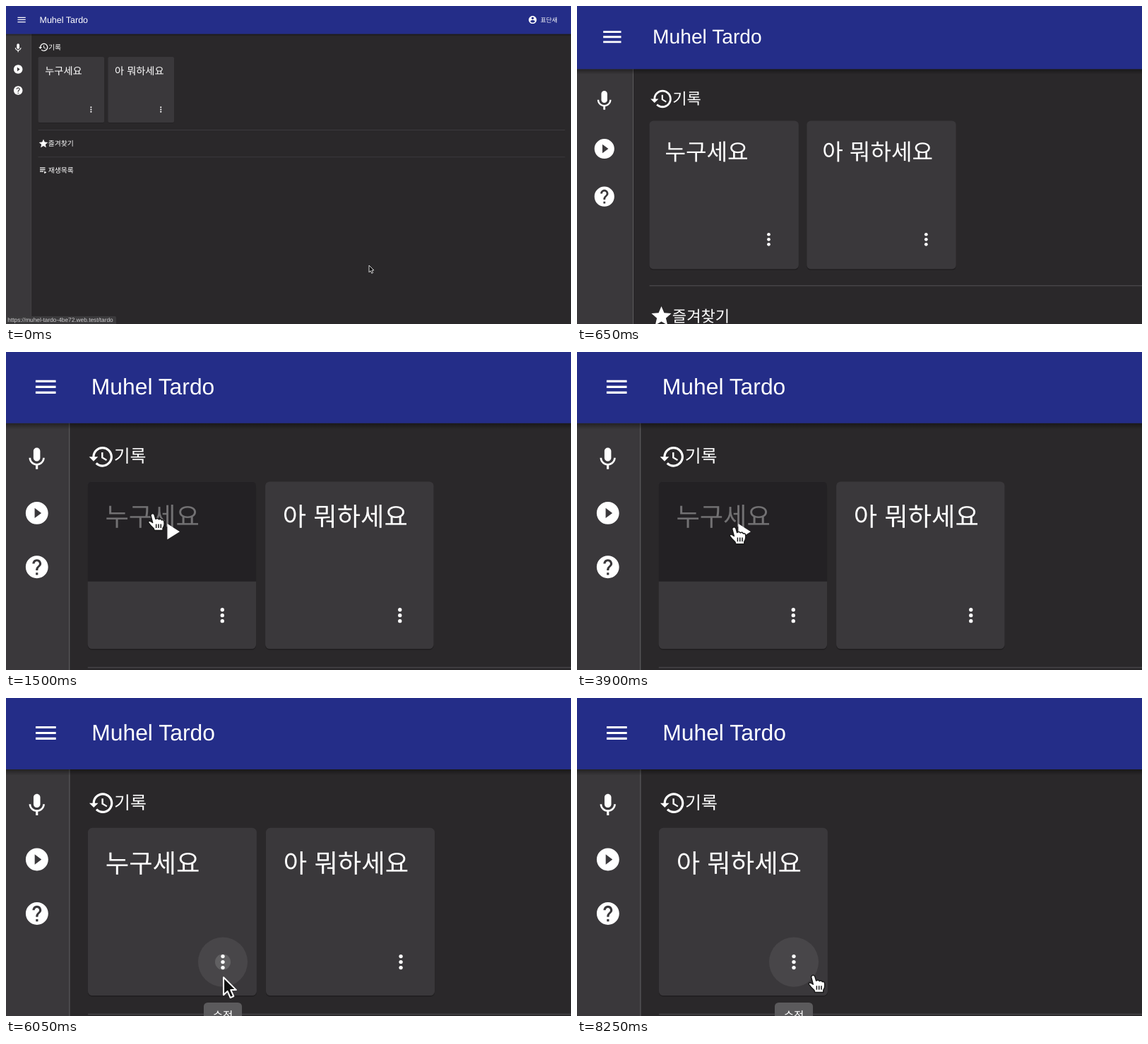
An HTML page that plays this animation: 800 px wide and 450 px high, repeating every 8300 ms.

```html
<!DOCTYPE html>
<html lang="ko">
<head>
<meta charset="utf-8">
<style>
html, body { margin: 0; width: 100%; height: 100%; overflow: hidden; background: #2a282a; }
svg { display: block; width: 800px; height: 450px; }
text { fill: #fff; font-family: "Noto Sans CJK KR", "Noto Sans CJK", sans-serif; text-rendering: geometricPrecision; }
.latin { font-family: "Liberation Sans", Arial, sans-serif; }
.icon { fill: #fff; }
</style>
</head>
<body>
<svg viewBox="0 0 800 450">
  <defs>
    <linearGradient id="shade" x2="0" y2="1">
      <stop stop-color="#000" stop-opacity=".4"/>
      <stop offset="1" stop-color="#000" stop-opacity="0"/>
    </linearGradient>
  </defs>
  <g id="page">
    <rect width="800" height="450" fill="#2a282a"/>
    <rect y="39" width="35" height="411" fill="#3a383b"/>
    <rect x="35" y="39" width=".5" height="411" fill="#5b595c"/>
    <rect y="39.6" width="800" height="3.4" fill="url(#shade)"/>
    <rect width="800" height="39.6" fill="#242d88"/>
    <text class="latin" x="47.5" y="23.6" font-size="12.5">Muhel Tardo</text>
    <text x="756.7" y="22.8" font-size="8.75">표단새</text>
    <path d="M45.5 175.5H791.5M45.5 213.7H791.5" stroke="#464447" stroke-width=".65"/>
    <text x="60" y="61.5" font-size="9.8">기록</text>
    <text x="59.8" y="198.2" font-size="9.8">즐겨찾기</text>
    <text x="59.8" y="236.2" font-size="9.8">재생목록</text>
    <g id="icons"></g>
    <g id="cards"></g>
    <g id="tip">
      <rect x="109.8" y="169" width="21.2" height="13.8" rx="2.2" fill="#5b5a5c"/>
      <text x="114.8" y="178.3" font-size="6.1">수정</text>
    </g>
    <g id="menu">
      <rect x="106.4" y="133.8" width="62.6" height="32" rx="2.5" fill="#000" opacity=".25"/>
      <rect x="106.7" y="133" width="62" height="32" rx="2.5" fill="#424043"/>
      <text x="116.7" y="152.8" font-size="10">삭제하기</text>
    </g>
    <g id="status">
      <path d="M0 439H154Q156 439 156 441V450H0Z" fill="#3b3a3c"/>
      <text class="latin" x="2.3" y="447.2" font-size="8.3" style="fill:#d0cfd1">https://muhel-tardo-4be72.web.test/tardo</text>
    </g>
    <g id="cursor">
      <path id="arrow" d="M0 0V9.8L2.2 7.7 3.8 11.3 5.6 10.5 4 7H7Z" fill="#111" stroke="#fff" stroke-width=".8" stroke-linejoin="round"/>
      <g id="hand" stroke="#1a1a1a" stroke-width=".6" stroke-linejoin="round">
        <path d="M-1.2 1Q-.2-.6.9.8L1.6 3.2Q2.7 2.4 3.4 3.4 4.5 2.7 5 3.8 6.1 3.4 6.3 4.6 6.7 6.8 5.6 8.3V9.6H.9L.5 8.5Q-1.2 7-2.6 5-2.2 3.6-.1 5.2Z" fill="#fff"/>
        <path d="M1.9 6V8.2M3.2 6V8.2M4.5 6V8.2" fill="none"/>
      </g>
    </g>
  </g>
</svg>
<script>
const LOOP = 8300, SHIFT = 98.85;
const $ = id => document.getElementById(id);
const clamp = x => Math.min(1, Math.max(0, x));
const cubic = p => p < .5 ? 4 * p ** 3 : 1 - 4 * (1 - p) ** 3;
const ramp = (t, a, b) => clamp((t - a) / (b - a));
const ease = (t, a, b) => cubic(ramp(t, a, b));
const show = (id, a) => $(id).setAttribute('opacity', a);

const disc = 'M12 2C6.48 2 2 6.48 2 12s4.48 10 10 10 10-4.48 10-10S17.52 2 12 2z';
const icon = (x, y, d, k = .625) =>
  `<path class="icon" fill-rule="evenodd" transform="translate(${x} ${y}) scale(${k})" d="${d}"/>`;

$('icons').innerHTML =
  icon(14.6, 11.9, 'M3 18h18v-2H3zm0-5h18v-2H3zm0-7v2h18V6z') +
  icon(739, 12.8, disc + 'm0 3c1.66 0 3 1.34 3 3s-1.34 3-3 3-3-1.34-3-3 1.34-3 3-3zm0 14.2c-2.5 0-4.71-1.28-6-3.22.03-1.99 4-3.08 6-3.08 1.99 0 5.97 1.09 6 3.08-1.29 1.94-3.5 3.22-6 3.22z', .56) +
  icon(9.65, 52, 'M12 14c1.66 0 3-1.34 3-3V5c0-1.66-1.34-3-3-3S9 3.34 9 5v6c0 1.66 1.34 3 3 3zm5.3-3c0 3-2.54 5.1-5.3 5.1S6.7 14 6.7 11H5c0 3.41 2.72 6.23 6 6.72V21h2v-3.28c3.28-.48 6-3.3 6-6.72z') +
  icon(9.7, 82.1, disc + 'm-2 14.5v-9l6 4.5z') +
  icon(9.7, 112.1, disc + 'm1 17h-2v-2h2zm2.07-7.75l-.9.92C13.45 12.9 13 13.5 13 15h-2v-.5c0-1.1.45-2.1 1.17-2.83l1.24-1.26c.37-.36.59-.86.59-1.41 0-1.1-.9-2-2-2s-2 .9-2 2H8c0-2.21 1.79-4 4-4s4 1.79 4 4c0 .88-.36 1.68-.93 2.25z') +
  icon(45.6, 50.8, 'M13 3c-4.97 0-9 4.03-9 9H1l3.89 3.89.07.14L9 12H6c0-3.87 3.13-7 7-7s7 3.13 7 7-3.13 7-7 7c-1.93 0-3.68-.79-4.94-2.06l-1.42 1.42C8.27 19.99 10.51 21 13 21c4.97 0 9-4.03 9-9s-4.03-9-9-9zm-1 5v5l4.28 2.54.72-1.21-3.5-2.08V8z') +
  icon(45.5, 187.2, 'M12 17.27L18.18 21l-1.64-7.03L22 9.24l-7.19-.61L12 2 9.19 8.63 2 9.24l5.46 4.73L5.82 21z') +
  icon(45.5, 224.8, 'M4 10h12v2H4zm0-4h12v2H4zm0 8h8v2H4zm10 0v6l5-3z');

const box = 'x="45.45" width="93.75" rx="2.5"';
const dots = [-1, 0, 1].map(i => `<circle class="icon" cx="120.4" cy="${146.5 + i * 3.13}" r="1.05"/>`).join('');
const card = (id, label, extra = '') => `<g id="${id}">
  <rect ${box} y="72.8" height="93" fill="#000" opacity=".22"/>
  <rect ${box} y="72.1" height="93" fill="#3a383b"/>
  ${extra}<text id="${id}Text" x="55.2" y="96.8" font-size="14.25">${label}</text>
  <circle id="${id}Hover" cx="120.4" cy="146.5" r="13.75" fill="#484649"/>
  <circle id="${id}Ripple" cx="120.4" cy="146.5" r="0" fill="#fff" opacity=".14"/>${dots}</g>`;
$('cards').innerHTML =
  card('one', '누구세요', `<g id="cover"><path d="M45.45 127.7V74.6q0-2.5 2.5-2.5h88.75q2.5 0 2.5 2.5v53.1z" fill="#232124"/>
    ${icon(84.8, 92.4, 'M8 5v14l11-7z')}</g>`) +
  card('two', '아 뭐하세요');

// Pointer legs in page units: start, end, target x, target y
const legs = [[800, 1450, 81.7, 89.7], [1500, 1700, 87.5, 97.2], [4800, 5250, 120.8, 155],
  [6400, 6700, 129, 152], [6900, 7100, 131.2, 153.7]];

function pointer(t) {
  let x = 514, y = 367;
  for (const [a, b, tx, ty] of legs) {
    const p = ease(t, a, b);
    x += (tx - x) * p;
    y += (ty - y) * p;
  }
  return [x, y];
}

function draw(now) {
  const t = now % LOOP;
  const zoom = 1 + 1.544 * ease(t, 0, 1018) + .006 * ease(t, 4300, 4550);
  $('page').setAttribute('transform', `scale(${zoom})`);

  const cover = ramp(t, 1240, 1400) - ramp(t, 5000, 5150);
  show('cover', cover);
  show('oneText', 1 - .64 * cover);

  show('oneHover', ramp(t, 5450, 5600) - ramp(t, 6150, 6250));
  $('oneRipple').setAttribute('r', 13.75 * ramp(t, 5980, 6205));
  show('oneRipple', .14 * (1 - ramp(t, 6150, 6250)));
  show('menu', ramp(t, 6080, 6250) - ramp(t, 7250, 7400));

  const removed = t >= 7450;
  show('one', removed ? 0 : 1);
  $('two').setAttribute('transform', `translate(${removed ? 0 : SHIFT} 0)`);
  show('twoHover', ramp(t, 7780, 7930));
  show('tip', ramp(t, 5500, 5700) - ramp(t, 6100, 6250) + ramp(t, 7850, 8050));
  show('status', t < 400 ? 1 : 0);

  const hand = t >= 1240 && t < 5030 || t >= 6300;
  show('hand', hand ? 1 : 0);
  show('arrow', hand ? 0 : 1);
  $('cursor').setAttribute('transform', `translate(${pointer(t)})`);
}

const start = performance.now();
function tick() {
  draw(performance.now() - start);
  requestAnimationFrame(tick);
}
tick();
</script>
</body>
</html>
```
